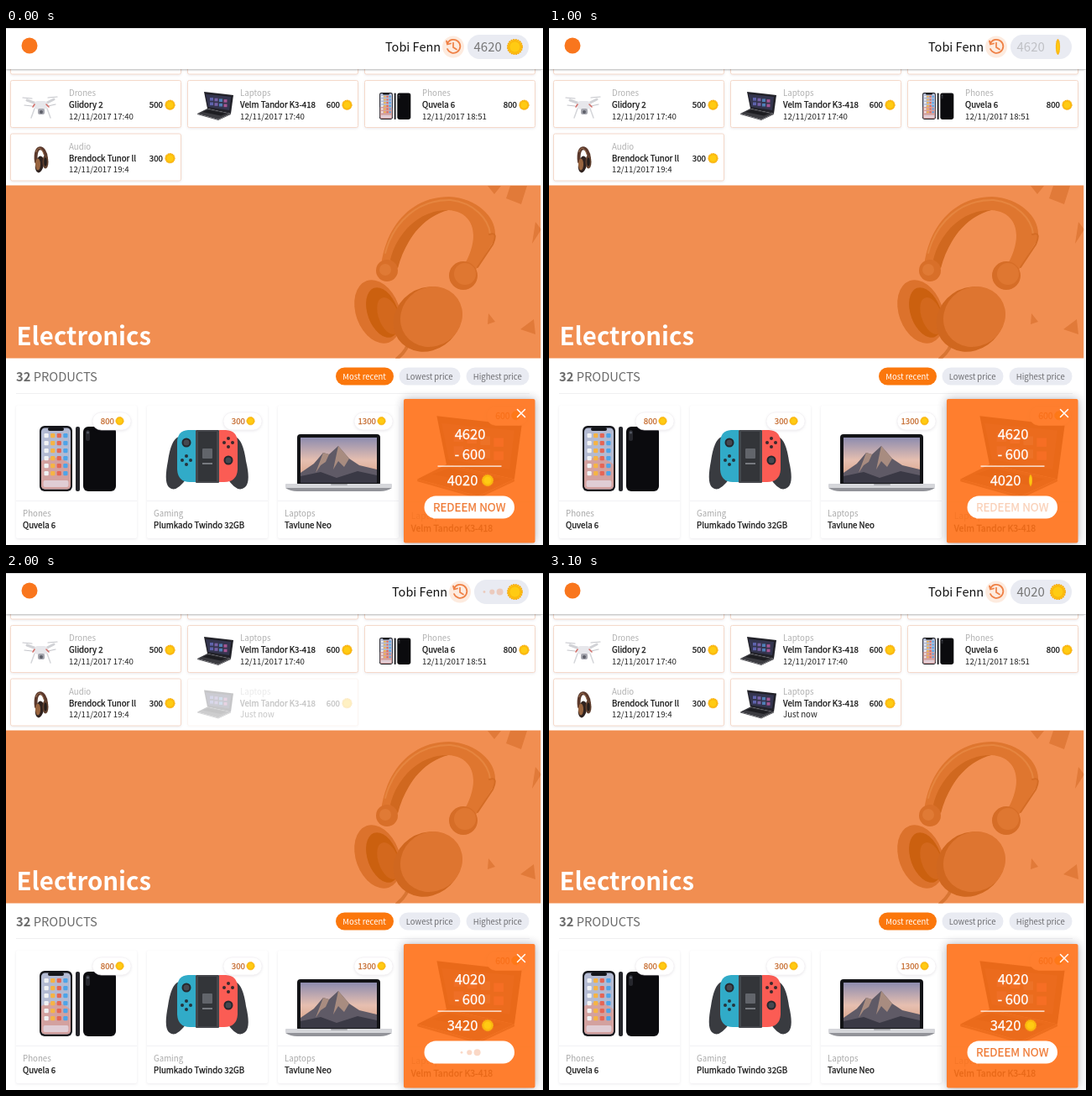
Recreate the animation shown at these times as an HTML page. Size 640x616 px, loop 3.2 s.

```html
<!DOCTYPE html>
<html lang="en">
<head>
<meta charset="utf-8">
<title>Reward shop</title>
<style>
html, body { margin: 0; width: 100%; height: 100%; overflow: hidden; background: #fff; }
svg { display: block; width: 640px; height: 616px; font: 9.7px 'Noto Sans CJK JP', 'Noto Sans CJK SC', 'Noto Sans CJK', 'Open Sans', sans-serif; }
text { white-space: pre; }
.strong { font-weight: 500; stroke: currentColor; stroke-width: .25px; }
.soft { filter: drop-shadow(0 1px 1.5px rgba(60, 50, 80, .1)); }
</style>
</head>
<body>
<svg id="stage" viewBox="0 0 640 616"></svg>
<script>
const LOOP = 3200, STEP = 100;
const LAPTOP = 'Velm Tandor K3-418', PHONE = 'Quvela 6';

const rect = (x, y, w, h, fill, r = 0, more = '') =>
  `<rect x="${x}" y="${y}" width="${w}" height="${h}" rx="${r}" fill="${fill}" ${more}/>`;
const oval = (x, y, rx, ry, fill, more = '') =>
  `<ellipse cx="${x}" cy="${y}" rx="${rx}" ry="${ry}" fill="${fill}" ${more}/>`;
const dot = (x, y, r, fill, more) => oval(x, y, r, r, fill, more);
const path = (d, fill, more = '') => `<path d="${d}" fill="${fill}" ${more}/>`;
const line = (d, color, width, more = '') =>
  path(d, 'none', `stroke="${color}" stroke-width="${width}" stroke-linecap="round" ${more}`);
const text = (x, y, str, fill, more = '') => `<text x="${x}" y="${y}" fill="${fill}" ${more}>${str}</text>`;
const strong = (x, y, str, fill, more = '') => text(x, y, str, fill, `class="strong" color="${fill}" ${more}`);
const at = (x, y, scale, body, more = '') =>
  `<g transform="translate(${x} ${y}) scale(${scale})" ${more}>${body}</g>`;
const END = 'text-anchor="end"';

const coin = (x, y, r, id = '') => at(x, y, r / 10, `<g id="${id}">` +
  dot(0, 0, 9.2, '#ffc30d', 'stroke="#f5a914" stroke-width="1.7" stroke-dasharray="2 .9"') +
  dot(0, 0, 7, '#ffcb13', 'stroke="#f7b00e" stroke-width="1"') + '</g>');

const laptop = path('M8 1L43 5 40 27 12 21Z', '#222229') +
  path('M10 4L40 7 38 23 13 19Z', '#34354f') +
  [0, 1, 2, 3, 4, 5, 6, 7].map(i => rect(15 + i % 4 * 5.5, 8 + (i >> 2) * 5.5 + i % 4 * .7, 4, 3.6,
    ['#5e63ad', '#a65794', '#507fb6', '#7862a7'][(i * 3) % 4])).join('') +
  path('M12 21L40 27 25 34 0 27Z', '#3b3b40') + path('M13 22.5L35 27 28 29.5 6 25Z', '#1d1d21') +
  path('M0 27L25 34 40 27V28L25 35 0 28Z', '#55555a');

const phones = '<g>' + rect(0, 0, 39, 78, '#15161b', 6) + rect(2, 2.5, 35, 73, '#b3bad2', 4.5) +
  path('M2 42Q20 32 37 46V71Q36.5 75.5 32.5 75.5H6.5Q2 75 2 71Z', '#d3a19f') + rect(10, 2, 19, 4, '#15161b', 2) +
  Array.from({ length: 24 }, (_, i) => rect(5.5 + i % 4 * 7.6, 9 + (i >> 2) * 9, 5.2, 5.2,
    ['#f1f2f4', '#4ea4e8', '#57bd70', '#e56555', '#33343e', '#f5b445', '#8063ba'][(i * 5 + (i >> 2)) % 7], 1.2)).join('') +
  rect(4.5, 65, 30, 8, '#e0cdd5', 2) + rect(43, 1, 5, 77, '#232429', 2) + rect(52, 1, 39, 77, '#0b0b0e', 6) +
  rect(55, 5, 5, 13, '#26272d', 2.5) + dot(57.5, 8, 1.5, '#555a65') + '</g>';

const drone = line('M5 7L16 11H27L37 6', '#d1d2d6', 3) + rect(13, 8, 17, 10, '#e7e7eb', 5) +
  line('M14 17L10 28M29 17L33 28', '#d4d5d9', 1.5) + rect(18, 17, 8, 7, '#a5a6ae', 2) + dot(22, 21, 2, '#5c5e67') +
  line('M0 4L11 5M30 4L41 3M2 13L11 14M30 14L39 12', '#c4c5ca', 1.2) + line('M14 12L12 15M28 12L31 15', '#d2706b', 1.6);

const miniPhones = line('M6 18C3 -4 17 -2 18 14', '#5b392c', 4) + line('M6 6C8 -1 13 1 15 9', '#a47755', 1) +
  oval(10, 21, 5, 10, '#2f221f', 'transform="rotate(10 10 21)"') + oval(8, 21, 3, 7, '#98643f') +
  oval(17, 18, 3.5, 8, '#60402f') + oval(17, 18, 1.7, 5, '#251d1b');

const gamepad = path('M17 8Q7 9 3 37Q-2 62 4 68Q12 76 25 58H74Q86 76 95 68Q102 62 96 37Q92 9 82 8Z', '#393b40') +
  path('M36 0H27Q14 1 14 15V47Q15 62 29 62H36Z', '#31abc8') + path('M64 0H72Q86 1 86 15V47Q85 62 70 62H64Z', '#fb5c54') +
  rect(36, 0, 28, 63, '#45474c', 1) + rect(39, 2, 22, 59, '#333539') + rect(44, 22, 12, 12, '#62656b', 1) +
  dot(25, 15, 5.5, '#25282e') + dot(25, 15, 3.5, '#454850') + dot(75, 36, 5.5, '#25282e') + dot(75, 36, 3.5, '#454850') +
  [[0, -5], [5, 0], [0, 5], [-5, 0]].map(([x, y]) => dot(25 + x, 36 + y, 2, '#25343c') + dot(75 + x, 15 + y, 2, '#3a292c')).join('') +
  rect(44, 39, 12, 2, '#777a80');

const notebook = rect(14, 0, 99, 62, '#121316', 4) + rect(18, 4, 91, 54, 'url(#dusk)') +
  path('M18 46L34 35 45 22 52 24 63 14 76 29 88 37 109 42V58H18Z', '#5f5a66') +
  path('M45 22L52 24 48 33 42 37 36 46ZM63 14L76 29 70 39 63 32 57 42Z', '#a88c80') +
  path('M18 50L42 45 61 52 86 44 109 49V58H18Z', '#3a3945') +
  rect(0, 59, 127, 5, '#d5d6da', 1) + path('M0 64H127Q121 68 113 68H14Q6 68 0 64Z', '#929399') + rect(54, 59, 20, 2, '#a6a7ad', 1);

const historyFrame = rect(.5, .5, 203, 56, '#fff', 2, 'class="soft" stroke="#f5d9ca"');
const historyCard = (x, y, tx, kind, name, date, price, art) => at(x, y, 1, historyFrame + art +
  text(tx, 19, kind, '#b1b1b1') + strong(tx, 33, name, '#111') + text(tx, 46.8, date, '#222') +
  strong(182, 33, price, '#111', END) + coin(190.5, 29.7, 6.1));

const productCard = (x, y, scale, kind, name, price, art) => at(x, y, scale,
  rect(0, 0, 144, 158, '#fff', 2, 'class="soft"') + art +
  rect(91, 8, 46, 21, '#fff', 10.5, 'class="soft" stroke="#f2eff2" stroke-width=".7"') +
  strong(117, 22.4, price, '#c4692b', END) + coin(123.5, 18.2, 5.1) +
  rect(0, 113, 144, 1, '#f2f2f4') + text(8, 132, kind, '#a9a9a9') + strong(8, 146, name, '#111'));

const filter = (x, w, label, bg, fg) => rect(x, 404.5, w, 21, bg, 10.5) + text(x + 8.3, 418.6, label, fg, 'font-size="9.5"');

const headphones = line('M481 370Q479 384 466 394', '#d87533', 4) +
  path('M447 283C452 240 480 201 528 201C568 203 590 234 581 254L560 288 547 281C566 246 557 219 527 217C494 220 471 256 467 286Z', '#df762f') +
  path('M458 276C465 246 492 216 527 217C494 226 475 256 467 286Z', '#d0681f') +
  line('M452 268C462 230 492 204 530 205C558 208 575 228 577 245', '#e6853f', 2) +
  line('M576 246Q587 242 580 258L562 285', '#d46c25', 2) +
  dot(454, 289, 13, '#d86f29') + dot(452, 288, 7, '#e07a35') +
  oval(443, 338, 26, 39, '#dc722c', 'transform="rotate(-20 443 338)"') +
  oval(449, 339, 18, 31, '#cb600f', 'transform="rotate(-20 449 339)"') +
  oval(456, 343, 12, 23, '#d3681d', 'transform="rotate(-20 456 343)"') +
  oval(502, 347, 42, 37, '#d0671f', 'transform="rotate(-35 502 347)"') +
  oval(507, 344, 38, 35, '#de7530', 'transform="rotate(-35 507 344)"') +
  dot(545, 295, 17, '#d66d27') + dot(547, 293, 13, '#df7731') +
  path('M574 188H590L582 198ZM601 188H621L614 210 596 203ZM631 231L638 240 627 257ZM629 347L631 365 613 359ZM575 340L583 350 574 353Z', '#e17a39');

const loader = (id, x, y) => `<g id="${id}">` + [0, 1, 2].map(i => dot(x + i * 9.3, y, 4, '#f1854c')).join('') + '</g>';

const history =
  [5, 216, 427].map(x => at(x, -1.5, 1, historyFrame)).join('') +
  historyCard(5, 62, 70, 'Drones', 'Glidory 2', '12/11/2017 17:40', 500, at(15, 17, 1, drone)) +
  historyCard(216, 62, 63, 'Laptops', LAPTOP, '12/11/2017 17:40', 600, at(12, 13, 1, laptop)) +
  historyCard(427, 62, 69, 'Phones', PHONE, '12/11/2017 18:51', 800, at(18, 15, .41, phones)) +
  historyCard(5, 125.5, 70, 'Audio', 'Brendock Tunor ll', '12/11/2017 19:4', 300, at(25, 16, 1, miniPhones)) +
  `<g id="newItem">${historyCard(216, 125.5, 63, 'Laptops', LAPTOP, 'Just now', 600, at(12, 13, 1, laptop))}</g>`;

const header =
  rect(0, -4, 640, 53, '#fff', 0, 'style="filter:drop-shadow(0 1px 1px rgba(0,0,0,.3))"') +
  rect(0, 0, 640, 1, '#dededf') + dot(28, 21, 9.5, '#f9761d') +
  '<g id="user">' + text(452, 27.8, 'Tobi Fenn', '#111', 'font-size="14.5"') + dot(533, 22.5, 13, '#fdebdf') +
  line('M526 25A8 8 0 1 0 526.2 18.2M525 15.5L526 19.5 530 18.5', '#ef8146', 1.8) +
  line('M533 17.5V23L537 25.5', '#ef8146', 1.7) + '</g>' +
  '<rect id="pill" y="8" height="29" rx="14.5" fill="#e9ebf2"/>' +
  text(557.5, 28.2, '', '#767676', 'id="balance" font-size="15"') + loader('headLoader', 570, 22.5) + coin(606.5, 22.5, 9.5, 'headCoin');

const banner = rect(0, 187.5, 637.5, 206, '#f18e51') + `<g clip-path="url(#bannerClip)">${headphones}</g>` +
  text(12.5, 377.8, 'Electronics', '#fff', 'font-size="29.4" font-weight="700"');

const products =
  text(12, 420.5, '<tspan font-weight="700">32</tspan> PRODUCTS', '#6a6a6a', 'font-size="14.7"') +
  filter(393, 69, 'Most recent', '#fb770c', '#fff') + filter(468.5, 73, 'Lowest price', '#e9ebf2', '#6e6e72') +
  filter(548.5, 75, 'Highest price', '#e9ebf2', '#6e6e72') + rect(12, 435, 612, 1, '#efeff1') +
  productCard(12, 450, 1, 'Phones', PHONE, 800, at(28, 24, 1, phones)) +
  productCard(168, 450, 1, 'Gaming', 'Plumkado Twindo 32GB', 300, at(22, 29, 1, gamepad)) +
  productCard(324, 450, 1, 'Laptops', 'Tavlune Neo', 1300, at(9, 34, 1, notebook)) +
  productCard(474, 442, 1.083, 'Laptops', LAPTOP, 600, at(15, 16, 2.67, laptop));

const big = (y, str, x, id = '') => strong(x, y, str, '#fff', `id="${id}" font-size="16.6" ${END}`);
const modal =
  rect(474, 442, 156.5, 171.5, '#ff7118', 2, 'opacity=".9" style="filter:drop-shadow(0 0 6px rgba(40,40,60,.38))"') +
  line('M609.5 454.5L618.5 463.5M618.5 454.5L609.5 463.5', '#fff', 1.5) +
  big(490, '', 571.5, 'before') + big(513.5, '- 600', 571.5) + rect(514.5, 521.5, 76, 1.2, '#fff') +
  big(545, '', 562.5, 'after') + coin(574, 539, 7.1, 'modalCoin') +
  rect(498.5, 557.5, 107.5, 27, '#fff', 13.5) +
  strong(552.2, 576.4, 'REDEEM NOW', '#ef7a35', 'id="redeem" font-size="13.4" text-anchor="middle"') +
  loader('modalLoader', 543, 571.3);

const stage = document.getElementById('stage');
stage.innerHTML = `<defs>
  <clipPath id="bannerClip">${rect(0, 187.5, 637.5, 206, '#000')}</clipPath>
  <linearGradient id="dusk" x2="0" y2="1"><stop stop-color="#8d8caf"/><stop offset=".5" stop-color="#e6bfb0"/><stop offset="1" stop-color="#d59a7c"/></linearGradient>
</defs>` + rect(0, 0, 640, 616, '#fff') + history + banner + products + modal + header + rect(637.5, 50, 2.5, 566, '#f6f6f7');

const el = Object.fromEntries([...stage.querySelectorAll('[id]')].map(node => [node.id, node]));
const ramp = (t, from, to) => {
  const p = Math.min(1, Math.max(0, (t - from) / (to - from)));
  return p * p * (3 - 2 * p);
};

// Each dot grows for 560 ms, shrinks for 560 ms, then rests.
function pulse(group, t, opacity) {
  group.setAttribute('opacity', opacity);
  [...group.children].forEach((node, i) => {
    const p = (t + 1400 - 25 + (2 - i) * 160) % 1400;
    const r = 4 * (p < 560 ? ramp(p, 0, 560) : 1 - ramp(p, 560, 1120));
    node.setAttribute('rx', r);
    node.setAttribute('ry', r);
  });
}

function render(t) {
  const waiting = t >= 1200 && t < 2200, paid = t >= 1800;
  const label = t < 1200 ? 1 - ramp(t, 700, 1200) : ramp(t, 2250, 2700);
  const loading = .8 * ramp(t, 1200, 1600) * (1 - ramp(t, 1800, 2150));
  const turn = Math.PI * Math.sin(Math.PI / 2 * Math.min(1, t / 2500));
  const width = Math.max(.12, Math.abs(Math.cos(turn)));

  el.user.setAttribute('transform', `translate(${waiting ? 8 : 0} 0)`);
  el.pill.setAttribute('x', waiting ? 558 : 550);
  el.pill.setAttribute('width', waiting ? 65 : 73);
  el.balance.textContent = el.before.textContent = paid ? '4020' : '4620';
  el.after.textContent = paid ? '3420' : '4020';
  for (const node of [el.balance, el.redeem]) node.setAttribute('opacity', label);
  for (const node of [el.headCoin, el.modalCoin]) node.setAttribute('transform', `scale(${width} 1)`);
  pulse(el.headLoader, t, loading);
  pulse(el.modalLoader, t, loading);
  el.newItem.setAttribute('opacity', Math.min(1, Math.max(0, (t - 1800) / 800)));
}

function tick() {
  render(Math.floor(performance.now() % LOOP / STEP) * STEP);
  requestAnimationFrame(tick);
}
tick();
</script>
</body>
</html>
```
